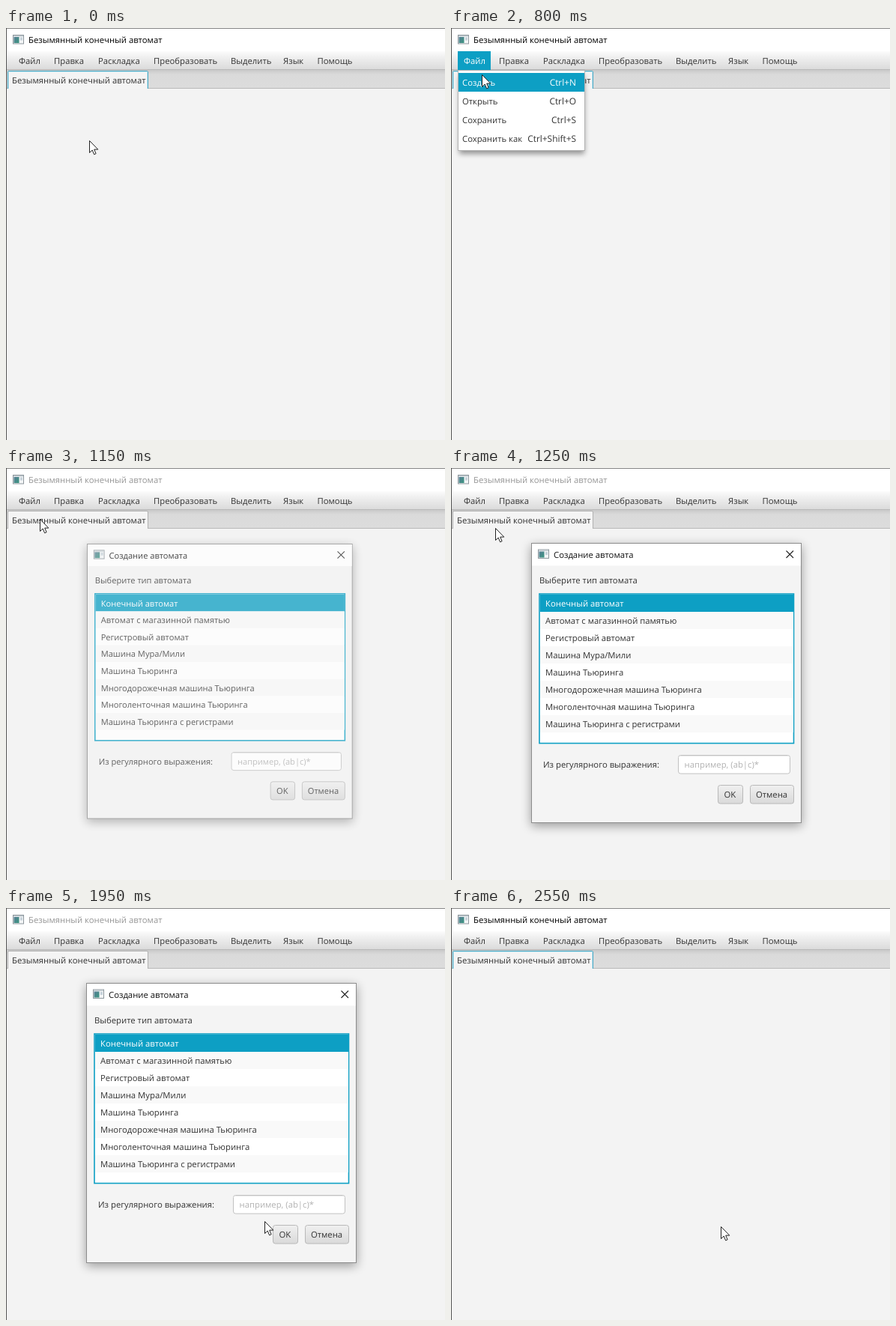
An HTML page that plays this animation: 586x550 px, repeating every 2600 ms.

```html
<!DOCTYPE html>
<html lang="ru">
<head>
<meta charset="utf-8">
<style>
html, body { margin: 0; width: 100%; height: 100%; overflow: hidden; background: #f3f3f3; }
svg { display: block; width: 586px; height: 550px; }
text { font: 11.3px "Open Sans", "Noto Sans", sans-serif; fill: #333; text-rendering: geometricPrecision; white-space: pre; }
text.key { font-size: 11.9px; text-anchor: end; }
</style>
</head>
<body>
<svg viewBox="0 0 586 550" xmlns="http://www.w3.org/2000/svg">
  <defs>
    <linearGradient id="bar" x2="0" y2="1">
      <stop offset="0" stop-color="#fcfcfc"/><stop offset=".3" stop-color="#f0f0f0"/><stop offset="1" stop-color="#dadada"/>
    </linearGradient>
    <linearGradient id="head" x2="0" y2="1">
      <stop offset="0" stop-color="#c9c9c9"/><stop offset=".25" stop-color="#dadada"/><stop offset="1" stop-color="#dcdcdc"/>
    </linearGradient>
    <linearGradient id="btn" x2="0" y2="1">
      <stop offset="0" stop-color="#f0f0f0"/><stop offset="1" stop-color="#d9d9d9"/>
    </linearGradient>
    <linearGradient id="pane" x2="1" y2="1">
      <stop offset="0" stop-color="#5a7f96"/><stop offset="1" stop-color="#39957f"/>
    </linearGradient>
    <filter id="soft" x="-20%" y="-20%" width="140%" height="140%"><feGaussianBlur stdDeviation="7"/></filter>
    <filter id="near" x="-20%" y="-20%" width="140%" height="140%"><feGaussianBlur stdDeviation="3.5"/></filter>
    <g id="icon">
      <rect x=".5" y=".5" width="14" height="11.5" fill="#f4f6f7" stroke="#8d979d"/>
      <rect x="1" y="1" width="13" height="1.5" fill="#c3ccd1"/>
      <rect x="1.5" y="3" width="7" height="8" fill="url(#pane)"/>
      <rect x="10" y="3.5" width="3" height="4" fill="#c6d2da"/>
    </g>
  </defs>

  <rect width="586" height="550" fill="#f3f3f3"/>
  <rect width="586" height="31" fill="#fff"/>
  <use href="#icon" x="9" y="9"/>
  <text id="title" x="30" y="20">Безымянный конечный автомат</text>
  <rect y="31" width="586" height="25" fill="url(#bar)"/>
  <rect y="55" width="586" height="1" fill="#b9b9b9"/>
  <rect y="56" width="586" height="24" fill="url(#head)"/>
  <rect y="80" width="586" height="1" fill="#b8b8b8"/>
  <path id="tab" d="M2.5 81V59Q2.5 57.5 4 57.5H188Q189.5 57.5 189.5 59V81" fill="#f4f4f4"/>
  <path id="tabGlow" d="M3.5 81V58.5H188.5V81" fill="none" stroke="#c3e4ee"/>
  <text x="8" y="74">Безымянный конечный автомат</text>
  <rect id="fileBg" x="9" y="31" width="44" height="25" fill="#0d9fc4"/>
  <g id="bar-items"></g>
  <path d="M0 .5H586" stroke="#858585"/>
  <path d="M.5 0V550" stroke="#555"/>

  <g id="menu">
    <rect x="11" y="64" width="167" height="104" fill="#000" opacity=".4" filter="url(#near)"/>
    <rect x="9.5" y="56.5" width="169" height="107" fill="#fff" stroke="#b4b4b4"/>
    <rect id="newBg" x="10" y="60" width="168" height="25" fill="#0d9fc4"/>
  </g>

  <g id="dialog">
    <rect id="shade" x="107" y="104" width="361" height="374" fill="#000" filter="url(#soft)"/>
    <rect x="107.5" y="100.5" width="360" height="373" fill="#f4f4f4" stroke="#8c8c8c"/>
    <rect x="108" y="101" width="359" height="29.5" fill="#fff"/>
    <use href="#icon" x="116" y="108.5"/>
    <text id="caption" x="137" y="120">Создание автомата</text>
    <path id="close" d="M447.5 110.5L457 120M457 110.5L447.5 120" stroke="#222" stroke-width="1.1"/>
    <text x="118" y="154">Выберите тип автомата</text>
    <rect id="list" x="118" y="168" width="339.5" height="199.5" fill="#fff"/>
    <g id="rows"></g>
    <text x="123" y="400">Из регулярного выражения:</text>
    <rect x="303.5" y="383.5" width="149" height="24.5" rx="3" fill="#fff" stroke="#c2c2c2"/>
    <path d="M305 384.5H451" stroke="#e6e6e6"/>
    <text x="311.5" y="400" style="fill:#b2b2b2">например, (ab|c)*</text>
    <rect id="ok" x="356.5" y="423.5" width="33" height="24.5" rx="3"/>
    <text x="364.5" y="440">OK</text>
    <rect x="399.5" y="423.5" width="58" height="24.5" rx="3" fill="url(#btn)" stroke="#b9b9b9"/>
    <text x="407" y="440">Отмена</text>
  </g>

  <path id="cursor" d="M.5 .5V16.5L4.2 13L6.6 18.8L9.1 17.7L6.7 12.1H11.8Z" fill="#fff" stroke="#222" stroke-width="1"/>
</svg>
<script>
const NS = 'http://www.w3.org/2000/svg', LOOP = 2600, STEP = 50, BLUE = '#0d9fc4';
const $ = id => document.getElementById(id);

function add(parent, tag, attrs, text) {
  const el = document.createElementNS(NS, tag);
  for (const k in attrs) el.setAttribute(k, attrs[k]);
  if (text) el.textContent = text;
  return parent.appendChild(el);
}
const set = (id, attrs) => { for (const k in attrs) $(id).setAttribute(k, attrs[k]); };
const show = (id, on) => { $(id).style.display = on ? '' : 'none'; };
const tint = (el, color) => { el.style.fill = color; };

const barItems = [[17, 'Файл'], [64, 'Правка'], [123, 'Раскладка'], [197, 'Преобразовать'],
  [300, 'Выделить'], [370, 'Язык'], [415.5, 'Помощь']]
  .map(([x, s]) => add($('bar-items'), 'text', { x, y: 48 }, s));

const menuItems = [['Создать', 'Ctrl+N'], ['Открыть', 'Ctrl+O'], ['Сохранить', 'Ctrl+S'],
  ['Сохранить как', 'Ctrl+Shift+S']].map(([name, key], i) => {
  const y = 77 + 25 * i;
  return [add($('menu'), 'text', { x: 15, y }, name),
    add($('menu'), 'text', { x: 167, y, class: 'key' }, key)];
});

const rows = ['Конечный автомат', 'Автомат с магазинной памятью', 'Регистровый автомат',
  'Машина Мура/Мили', 'Машина Тьюринга', 'Многодорожечная машина Тьюринга',
  'Многоленточная машина Тьюринга', 'Машина Тьюринга с регистрами'].map((s, i) => {
  const bg = add($('rows'), 'rect', { x: 119, y: 169 + 23 * i, width: 338, height: 23, fill: i % 2 ? '#f9f9f9' : '#fff' });
  return { bg, label: add($('rows'), 'text', { x: 126, y: 185 + 23 * i }, s) };
});

// time, x, y of the pointer tip
const path = [[0, 111, 150], [50, 109, 147], [200, 72, 98], [400, 34, 47], [600, 32, 45], [700, 37, 54],
  [800, 41, 62], [1050, 41, 65], [1150, 45, 68], [1250, 59, 80], [1450, 132, 172], [1700, 268, 332],
  [1950, 345, 418], [2100, 364, 438], [2350, 364, 438], [2450, 362, 431], [2550, 360, 425]];

function slope(i, k) {
  const a = path[i - 1], b = path[i], c = path[i + 1];
  if (!a || !c) return 0;
  const l = (b[k] - a[k]) / (b[0] - a[0]), r = (c[k] - b[k]) / (c[0] - b[0]);
  return l * r <= 0 ? 0 : 2 * l * r / (l + r);
}

function pointer(t, k) {
  let i = 0;
  while (i < path.length - 2 && t > path[i + 1][0]) i++;
  const p = path[i], q = path[i + 1], d = q[0] - p[0];
  const u = Math.min(1, (t - p[0]) / d), v = 1 - u;
  return p[k] * v * v * (1 + 2 * u) + q[k] * u * u * (3 - 2 * u)
    + d * u * v * (slope(i, k) * v - slope(i + 1, k) * u);
}

function draw(t) {
  const x = pointer(t, 1), y = pointer(t, 2);
  set('cursor', { transform: `translate(${x.toFixed(2)} ${y.toFixed(2)})` });

  // main window
  const active = t < 1100 || t >= 2350;
  tint($('title'), active ? '#000' : '#969696');
  set('tab', { stroke: active ? '#4aa9c4' : '#b0b0b0' });
  show('tabGlow', active);

  // drop-down menu
  const open = t >= 500 && t < 1000;
  const over = open || (t < 1000 && x < 53 && y > 31 && y < 56);
  const pick = open && y >= 60;
  show('fileBg', over);
  tint(barItems[0], over ? '#fff' : '#333');
  show('menu', open);
  show('newBg', pick);
  menuItems[0].forEach(el => tint(el, pick ? '#fff' : '#333'));

  // dialog
  const shown = t >= 1100 && t < 2500;
  show('dialog', shown);
  if (!shown) return;
  const rise = Math.min(1, (t - 1050) / 200);
  const fall = Math.max(0, (t - 2350) / 150);
  const alpha = (1 - (1 - rise) ** 2) * (1 - fall);
  const rest = (1 - rise) ** 2;
  const s = 1 - .07 * rest - .05 * fall;
  const ox = 107 + 4 * rest + 9 * fall, oy = 100 + 4 * rest + 9 * fall;
  set('dialog', { opacity: alpha, transform: `translate(${ox} ${oy}) scale(${s}) translate(-107 -100)` });

  const front = t < 2350, pressed = t >= 2200;
  set('shade', { opacity: front ? .36 : .2 });
  tint($('caption'), front ? '#111' : '#969696');
  show('close', front);
  set('list', { stroke: pressed ? '#c4c4c4' : BLUE, 'stroke-width': pressed ? 1 : 1.6 });
  tint(rows[0].bg, pressed ? '#d0d0d0' : BLUE);
  tint(rows[0].label, pressed ? '#333' : '#fff');
  const hover = x >= 356 && x <= 390 && y >= 423 && y <= 448;
  set('ok', {
    fill: pressed ? '#d2d2d2' : hover ? '#f0f0f0' : 'url(#btn)',
    stroke: pressed ? '#159fc3' : '#b9b9b9',
    'stroke-width': pressed ? 1.8 : 1
  });
}

const start = performance.now();
function tick() {
  const t = (performance.now() - start) % LOOP;
  draw(Math.floor(t / STEP) * STEP);
  requestAnimationFrame(tick);
}
tick();
</script>
</body>
</html>
```
